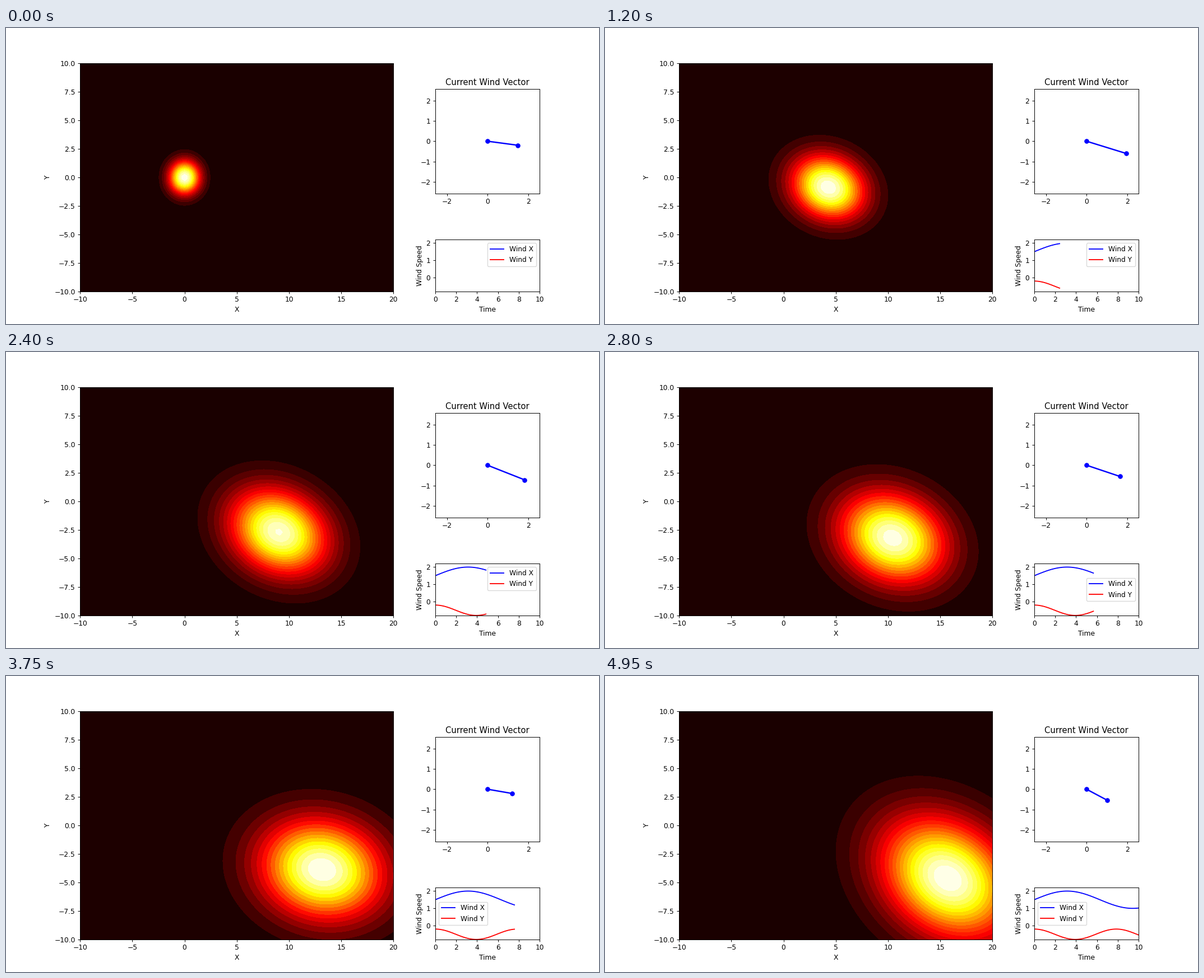
Write a matplotlib script that moves like this. It is 1058 by 529 pixels and loops after 5 s.

```python
import numpy as np
import matplotlib.pyplot as plt
from matplotlib.animation import FuncAnimation
from matplotlib.gridspec import GridSpec

FRAMES = 100
INTERVAL = 50
D_ALONG, D_ACROSS = 1.0, 0.5

plt.rcParams["font.family"] = "DejaVu Sans"

times = np.linspace(0, 10, FRAMES)
wind_x = 1.5 + 0.5 * np.sin(0.5 * times)
wind_y = -0.5 + 0.3 * np.cos(0.8 * times)

# Distance carried by the wind, integrated in closed form
drift_x = 1.5 * times + 1 - np.cos(0.5 * times)
drift_y = -0.5 * times + 0.375 * np.sin(0.8 * times)

X, Y = np.meshgrid(np.linspace(-10, 20, 100), np.linspace(-10, 10, 100))


def concentration(i):
    """Gaussian puff, stretched along the current wind direction."""
    angle = np.arctan2(wind_y[i], wind_x[i])
    dx, dy = X - drift_x[i], Y - drift_y[i]
    along = dx * np.cos(angle) + dy * np.sin(angle)
    across = -dx * np.sin(angle) + dy * np.cos(angle)
    var_along = 1 + 2 * D_ALONG * times[i]
    var_across = 1 + 2 * D_ACROSS * times[i]
    peak = 1 / (2 * np.pi * np.sqrt(var_along * var_across))
    return peak * np.exp(-along**2 / (2 * var_along) - across**2 / (2 * var_across))


fig = plt.figure(figsize=(12, 6), dpi=88.17)
grid = GridSpec(2, 2, width_ratios=[3, 1], height_ratios=[3, 1])

ax_plume = fig.add_subplot(grid[:, 0])
ax_plume.set(xlabel="X", ylabel="Y", xlim=(-10, 20), ylim=(-10, 10))

ax_vector = fig.add_subplot(grid[0, 1])
reach = 1.2 * np.hypot(wind_x, wind_y).max()
ax_vector.set(xlim=(-reach, reach), ylim=(-reach, reach), aspect="equal",
              title="Current Wind Vector")
vector, = ax_vector.plot([], [], "bo-", lw=2)

ax_speed = fig.add_subplot(grid[1, 1])
ax_speed.set(xlim=(0, 10), ylim=(wind_y.min(), 1.1 * wind_x.max()),
             xlabel="Time", ylabel="Wind Speed")
line_x, = ax_speed.plot([], [], "b-", label="Wind X")
line_y, = ax_speed.plot([], [], "r-", label="Wind Y")
ax_speed.legend(loc="best")

plume = None


def update(i):
    global plume
    if plume is not None:
        plume.remove()
    plume = ax_plume.contourf(X, Y, concentration(i), levels=20, cmap="hot")
    vector.set_data([0, wind_x[i]], [0, wind_y[i]])
    line_x.set_data(times[:i + 1], wind_x[:i + 1])
    line_y.set_data(times[:i + 1], wind_y[:i + 1])
    return plume, vector, line_x, line_y


anim = FuncAnimation(fig, update, frames=FRAMES, interval=INTERVAL,
                     init_func=lambda: update(0), repeat=True, repeat_delay=0)
plt.show()
```
